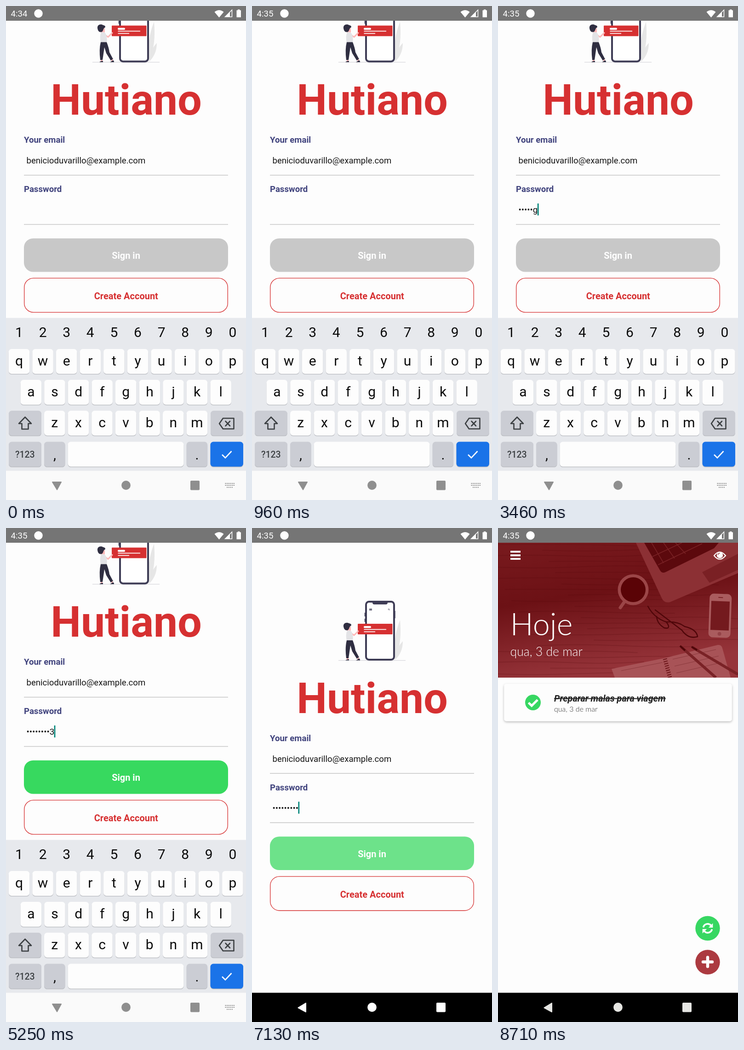
An HTML page that plays this animation: 522x1073 px, repeating every 8.79 s.

```html
<!DOCTYPE html>
<html lang="en">
<head>
<meta charset="utf-8">
<style>
  html, body { margin: 0; width: 100%; height: 100%; overflow: hidden; background: #fdfdfd; }
  svg { display: block; width: 100vw; height: 100vh; font-family: Roboto, sans-serif; }
  .mid { text-anchor: middle; }
  .b { font-weight: 700; }
  .label { font-weight: 700; font-size: 18.6px; fill: #40437d; }
  .field { font-size: 18.6px; fill: #151515; }
  .light { font-family: Lato, sans-serif; font-weight: 300; }
  .key { font-size: 30px; fill: #0b0b0b; }
  .line { fill: none; stroke-linecap: round; stroke-linejoin: round; }
</style>
</head>
<body>
<svg viewBox="0 0 522 1073" preserveAspectRatio="none">
  <defs>
    <linearGradient id="wood" x1="0" y1="0" x2=".25" y2="1">
      <stop offset="0" stop-color="#791a1e"/><stop offset=".45" stop-color="#6c1115"/><stop offset="1" stop-color="#96343a"/>
    </linearGradient>
    <filter id="shadow" x="-5%" y="-20%" width="110%" height="150%">
      <feDropShadow dx="0" dy="2" stdDeviation="2.5" flood-color="#000" flood-opacity=".28"/>
    </filter>
    <clipPath id="head"><rect y="32" width="522" height="293"/></clipPath>
  </defs>
  <rect width="522" height="1073" fill="#fdfdfd"/>

  <g id="login">
    <g id="art">
      <path d="M311 286C307 262 310 230 322 200C325 232 322 262 311 286ZM311 286C313 268 319 255 328 246C328 264 321 278 311 286Z" fill="#e6e6e6"/>
      <path d="M188 287.7H334" stroke="#cfced6"/>
      <path d="M246 184V192M246 197V204M310.5 180V196" stroke="#3f3d56" stroke-width="2.4"/>
      <rect x="248" y="160" width="61" height="126" rx="6.5" fill="#fff" stroke="#3f3d56" stroke-width="4"/>
      <path d="M262 159H295V162Q295 166 291 166H266Q262 166 262 162Z" fill="#3f3d56"/>
      <path d="M255 176H261M255 178.2H261" stroke="#3f3d56" stroke-width="1.4"/>
      <path d="M299.5 178.5L298 177" stroke="#3f3d56"/>
      <circle cx="297.5" cy="176.6" r="1.3" fill="none" stroke="#3f3d56" stroke-width=".7"/>
      <rect x="230" y="208" width="75.5" height="23" rx="1" fill="#d63031"/>
      <rect x="243" y="213" width="16" height="4.3" rx="2" fill="#fff"/>
      <path d="M243.5 220.3H292M243.5 225.3H268" stroke="#fff" stroke-width="1.8"/>
      <path class="line" d="M215 228L222 233L231 224" stroke="#ffb8b8" stroke-width="3"/>
      <path d="M209 214H215V222L212 227H206Z" fill="#ffb8b8"/>
      <path d="M199 214C198 206 206 204 211 207C217 208 217 212 214 213C211 215 212 220 208 222C203 223 200 220 199 214Z" fill="#2f2e41"/>
      <path d="M207 223Q213 220 217 226Q221 234 219 245H206Q203 231 207 223Z" fill="#e3e3e6"/>
      <path d="M206 244H219Q224 257 225 266L233 281L228 284L218 268L214 255L210 283H205Q202 260 206 244Z" fill="#2f2e41"/>
      <path d="M206 283H210V286H206ZM229 283L232 281L233 284L230 286Z" fill="#ffb8b8"/>
      <path d="M203 287.5Q206 284.5 211 285V287.5ZM226 287.5Q229 286 233 283L235 286V287.5Z" fill="#2f2e41"/>
    </g>
    <text class="mid b" x="261.5" y="401.5" font-size="93" fill="#d63031">Hutiano</text>
    <text class="label" x="39" y="462.5">Your email</text>
    <text class="field" x="44.5" y="507.5">benicioduvarillo@example.com</text>
    <text class="label" x="39" y="569.7">Password</text>
    <text class="field" id="pass" x="44.5" y="614.5"></text>
    <rect id="caret" y="594.5" width="2.7" height="26" fill="#00857a"/>
    <path d="M39 533H483M39 640H483" stroke="#c6c6c6" stroke-width="1.5"/>
    <g id="sign">
      <rect id="signBg" x="39" y="670.3" width="444" height="72.7" rx="20"/>
      <text class="mid b" x="261" y="714.5" font-size="20" fill="#fff">Sign in</text>
    </g>
    <rect x="39.7" y="756.8" width="442.6" height="74.2" rx="20" fill="#fdfdfd" stroke="#d63031" stroke-width="1.3"/>
    <text class="mid b" x="261.3" y="802.5" font-size="20" fill="#d63031">Create Account</text>
  </g>

  <g id="home">
    <g clip-path="url(#head)">
      <rect y="32" width="522" height="293" fill="url(#wood)"/>
      <path id="grain" class="line" stroke="#4f0508" stroke-opacity=".18" stroke-width="2"/>
      <path d="M300 32L356 152Q361 164 374 161L522 98V32Z" fill="#8c3034"/>
      <path d="M318 32L353 93Q357 99 364 96L470 44L480 32Z" fill="#5c090d"/>
      <path d="M334 32L360 76M360 32L384 66M386 32L408 56M336 62L400 32M348 80L444 34" stroke="#7a2225" stroke-width="1.5"/>
      <path d="M444 96L522 56V91L460 119Z" fill="#7a2024"/>
      <path class="line" d="M278 156L266 173" stroke="#9b4547" stroke-width="7"/>
      <circle cx="294" cy="134" r="33.5" fill="#9b4547"/>
      <circle cx="294" cy="134" r="27" fill="#5a0306"/>
      <g transform="rotate(2 483 190)">
        <rect x="459" y="143" width="48" height="95" rx="9" fill="#aa5c5e"/>
        <rect x="463" y="159" width="40" height="63" fill="#741a1e"/>
        <circle cx="483" cy="230" r="4" fill="#944347"/>
        <path d="M478 151H488" stroke="#7b2528" stroke-width="2"/>
      </g>
      <path class="line" d="M326 170Q340 196 366 204Q378 220 362 217Q346 208 345 192M366 204Q390 202 406 214Q432 220 434 236Q414 242 400 222L342 178" stroke="#4f0609" stroke-width="2.5"/>
      <path d="M247 306L360 283L478 254Q486 253 488 261L506 325H254Z" fill="#a85357"/>
      <path d="M268 310L358 292M380 285L474 264M384 300L480 278M388 315L486 292" stroke="#8a383c"/>
      <path d="M363 284L374 325" stroke="#6b1418" stroke-width="9" stroke-dasharray="2 3"/>
      <path d="M398 258L474 325M424 260L522 318" stroke="#7a2226" stroke-width="6"/>
      <path d="M396 256L407 266M421 258L433 265" stroke="#4f0609" stroke-width="4"/>
    </g>
    <path d="M27 51.5H49M27 59.3H49M27 67H49" stroke="#fff" stroke-width="4.2"/>
    <path d="M470 60Q482 44.5 495 60Q482 75.5 470 60Z" fill="none" stroke="#fff" stroke-width="2.2"/>
    <circle cx="482.5" cy="59" r="6.7" fill="#fff"/>
    <path d="M478.5 58Q479 55 482 54.7" class="line" stroke="#8c3034" stroke-width="1.3"/>
    <text class="light" x="26.6" y="233" font-size="66.5" fill="#fff">Hoje</text>
    <text class="light" x="26.6" y="278" font-size="26.6" fill="#fff">qua, 3 de mar</text>
    <rect x="13.3" y="338.5" width="495.5" height="81" rx="5" fill="#fdfdfd" filter="url(#shadow)"/>
    <circle cx="76" cy="379" r="17" fill="#37d762"/>
    <path d="M66.5 379.5L73.3 386L86 373.3" fill="none" stroke="#fff" stroke-width="5"/>
    <text class="b" x="122" y="376.5" font-size="19.8" font-style="italic" fill="#1f1f1f" text-decoration="line-through">Preparar malas para viagem</text>
    <text class="light" x="122" y="399" font-size="16" fill="#333">qua, 3 de mar</text>
    <circle cx="456" cy="869.5" r="26.7" fill="#37d762"/>
    <g id="sync" fill="#fff">
      <path d="M446.5 867.5A9.7 9.7 0 0 1 463 863" fill="none" stroke="#fff" stroke-width="3.6"/>
      <path d="M467.3 858.5V868H457.8Z"/>
    </g>
    <use href="#sync" transform="rotate(180 456 869.5)"/>
    <circle cx="456" cy="943" r="26.7" fill="#ac3a40"/>
    <path d="M446 942.5H466M456 932.5V952.5" class="line" stroke="#fff" stroke-width="6.4"/>
  </g>

  <g id="board"></g>

  <rect id="bar" y="1009.5" width="522" height="63.5"/>
  <g id="nav">
    <path id="back" d="M100.5 1042L117 1032V1051Z" stroke-width="2" stroke-linejoin="round"/>
    <circle cx="261" cy="1041" r="9.9"/>
    <rect x="401" y="1031" width="20" height="20.5" rx="2"/>
    <path id="picker" d="M476.5 1037H497M476.5 1041H497M480 1045.5H493" fill="none" stroke="#8f8f8f" stroke-width="2.2" stroke-dasharray="2.2 1.45"/>
  </g>

  <rect width="522" height="32" fill="#757575"/>
  <g fill="#fff">
    <text id="clock" x="10.5" y="23" font-size="18.6"></text>
    <circle cx="70.5" cy="16.3" r="9.2"/>
    <path d="M453.5 13Q463.5 5 473.5 13L463.5 25Z"/>
    <path d="M476.5 23.5L491.5 8.5V23.5Z" fill="none" stroke="#fff" stroke-width="1.5"/>
    <path d="M476 24L487 13V24Z"/>
    <path d="M504 7.5H508.5V9.3H511V24.5H501.5V9.3H504Z"/>
  </g>
</svg>
<script>
const $ = id => document.getElementById(id);
const LOOP = 8790, CLOSE = 5700, ENTER = 7710, PRESS = 7073;
const secret = 'moving123';
const typed = [2480, 2660, 2840, 3030, 3210, 3390, 4200, 4600, 5000];

// Keyboard
const text = (s, x, y, extra = 'class="mid key"') => `<text ${extra} x="${x}" y="${y}">${s}</text>`;
const key = (x, y, w, fill = '#fdfdfd') =>
  `<rect x="${x}" y="${y + 1.3}" width="${w}" height="54" rx="6.5" fill="#b9bbc0"/>` +
  `<rect x="${x}" y="${y}" width="${w}" height="54" rx="6.5" fill="${fill}"/>`;
const row = (chars, x, y) => [...chars].map((c, i) =>
  key(x + i * 51.6, y, 45.5) + text(c, x + 22.8 + i * 51.6, y + 36)).join('');
const gray = '#cbcdd4';
const icon = d => `<path class="line" d="${d}" stroke="#3c4043" stroke-width="2.6"/>`;
$('board').innerHTML =
  '<rect y="677.5" width="522" height="396" fill="#e7e9ed"/>' +
  [...'1234567890'].map((c, i) => text(c, 28.5 + i * 51.6, 719)).join('') +
  row('qwertyuiop', 5.7, 745) + row('asdfghjkl', 31.6, 812) + row('zxcvbnm', 83, 879) +
  key(6, 879, 71, gray) + key(445, 879, 71, gray) +
  key(6, 946.5, 71, gray) + key(83, 946.5, 45.5, gray) + key(134.5, 946.5, 252) +
  key(392.7, 946.5, 45.5, gray) + key(444.5, 946.5, 71.5, '#1a73e8') +
  icon('M41.5 893L55 907H48.5V919H34.5V907H28Z') +
  icon('M464 907L472 895.5H495.5V918.5H472ZM477.5 902L487 912M487 902L477.5 912') +
  text('?123', 41.3, 981, 'class="mid" font-size="19.5" font-weight="500" fill="#3c4043"') +
  text(',', 106, 985) + text('.', 415.5, 985) +
  '<path d="M470 974.5L477 981.5L490.5 967" fill="none" stroke="#fff" stroke-width="2.6"/>';

// Wood grain
let grain = '';
for (let i = 0; i < 24; i++) {
  const y = 36 + i * 12.2, x = (i * 137) % 260 - 40;
  grain += `M${x} ${y}q90 ${4 * Math.sin(i * 2)} 180 0t160 ${3 * Math.cos(i)}`;
}
$('grain').setAttribute('d', grain);

const set = (id, attrs) => { for (const k in attrs) $(id).setAttribute(k, attrs[k]); };
const show = (id, on) => set(id, { display: on ? 'inline' : 'none' });
const clamp = v => Math.max(0, Math.min(1, v));
const ease = p => p < .5 ? 2 * p * p : 1 - 2 * (1 - p) ** 2;

function password(t) {
  const n = typed.filter(at => at <= t).length, last = typed[n - 1];
  if (!n) return { s: '', on: t % 1000 >= 420 && t % 1000 < 920 };
  const reveal = t - last < 1500;
  return {
    s: '•'.repeat(reveal ? n - 1 : n) + (reveal ? secret[n - 1] : ''),
    on: (t - last) % 1000 < 500
  };
}

function draw(t) {
  const open = t < CLOSE, home = t >= ENTER;
  show('login', !home);
  show('home', home);
  $('clock').textContent = t < 480 ? '4:34' : '4:35';

  if (!home) {
    set('login', { transform: `translate(0 ${open ? -165.6 : 0})` });
    const { s, on } = password(t);
    $('pass').textContent = s;
    set('caret', { x: 44 + (s ? $('pass').getComputedTextLength() : 0) });
    show('caret', on);
    set('signBg', { fill: t >= typed[7] ? '#37d95f' : '#c8c8c8' });
    const dip = ease(clamp((t - PRESS) / 130)) - ease(clamp((t - PRESS - 130) / 137));
    set('sign', { opacity: 1 - .7 * dip });
  }

  const slide = clamp((t - CLOSE) / 200);
  show('board', slide < 1);
  set('board', { transform: `translate(0 ${slide * slide * 396})` });
  const tone = open ? '#8f8f8f' : home ? '#e6e6e3' : '#fff';
  set('bar', { fill: open ? '#fafafa' : '#000' });
  set('nav', { fill: tone });
  set('back', { stroke: tone, transform: open ? 'rotate(-90 110 1041)' : '' });
  show('picker', open);
}

function tick(now) {
  draw(now % LOOP);
  requestAnimationFrame(tick);
}
draw(0);
requestAnimationFrame(tick);
</script>
</body>
</html>
```
